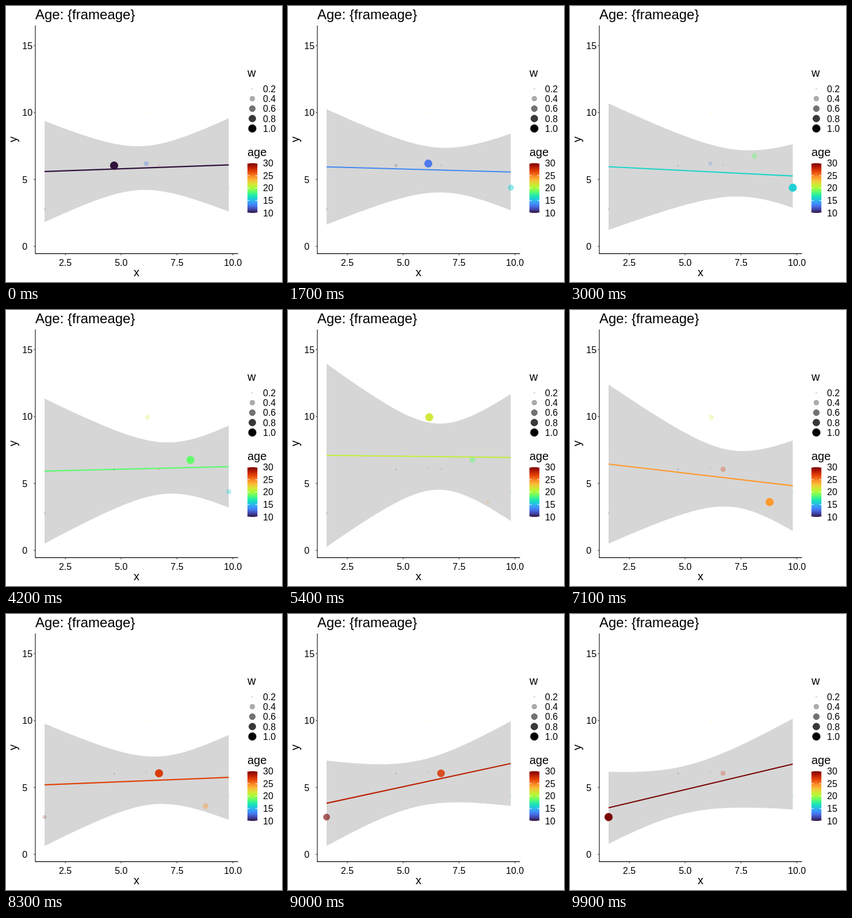
An HTML page that plays this animation: 480 px wide and 480 px high, repeating every 10 s.

```html
<!DOCTYPE html>
<html lang="en">
<head>
<meta charset="utf-8">
<title>Weighted regression by age</title>
<style>
  html, body { margin: 0; width: 100%; height: 100%; overflow: hidden; background: #fff; }
  svg { display: block; width: 100%; height: 100%; }
  text { font-family: "Liberation Sans", Arial, sans-serif; font-size: 16px; fill: #000; }
  .head { font-size: 20px; }
  .title { font-size: 24px; }
  .mid { text-anchor: middle; }
</style>
</head>
<body>
<svg id="stage" viewBox="0 0 480 480"></svg>
<script>
const FRAMES = 100, STEP = 100;
const AGE_MIN = 10, AGE_MAX = 30;
const SIGMA = 2, W_MIN = 0.2;
const T_CRIT = 2.4469; // 97.5 % quantile, 6 degrees of freedom
const LINE = 1.067;
const TURBO = ['30123b', '4145ab', '4675ed', '39a2fc', '1bcfd4', '24eca6', '61fc6c', 'a4fc3b',
  'd1e834', 'f3c63a', 'fe9b2d', 'f36315', 'd93806', 'b11901', '7a0402'];
const DATA = [[4.685, 6.04], [6.125, 6.19], [9.815, 4.39], [8.1, 6.76],
  [6.17, 9.95], [8.78, 3.61], [6.695, 6.06], [1.575, 2.79]]
  .map(([x, y], i) => ({ x, y, age: AGE_MIN + i * (AGE_MAX - AGE_MIN) / 7 }));

const stage = document.getElementById('stage');
const px = x => 5.9 + 38.87 * x;
const py = y => 418.1 - 23.28 * y;

function add(tag, attrs, parent = stage) {
  const el = document.createElementNS('http://www.w3.org/2000/svg', tag);
  set(el, attrs);
  parent.appendChild(el);
  return el;
}

function set(el, attrs) {
  for (const key in attrs) el.setAttribute(key, attrs[key]);
}

function label(text, x, y, cls = '', extra = {}) {
  add('text', { x, y, class: cls, ...extra }).textContent = text;
}

function rule(x1, y1, x2, y2, stroke = '#000') {
  return add('line', { x1, y1, x2, y2, stroke, 'stroke-width': LINE });
}

function turbo(age) {
  const t = (age - AGE_MIN) / (AGE_MAX - AGE_MIN) * (TURBO.length - 1);
  const i = Math.min(Math.floor(t), TURBO.length - 2);
  const channel = (hex, c) => parseInt(hex.substr(c * 2, 2), 16);
  const mix = c => Math.round(channel(TURBO[i], c) * (1 - t + i) + channel(TURBO[i + 1], c) * (t - i));
  return `rgb(${[0, 1, 2].map(mix)})`;
}

// Weight drives both the dot area and its opacity.
function styleDot(dot, w) {
  const k = (w - W_MIN) / (1 - W_MIN);
  const fontSize = (1 + 5 * Math.sqrt(k)) * 2.845 + 0.945;
  const alpha = 0.1 + 0.9 * k;
  set(dot, { r: 0.375 * fontSize, 'fill-opacity': alpha, 'stroke-opacity': alpha });
}

function addDot(cx, cy, color) {
  return add('circle', { cx, cy, fill: color, stroke: color, 'stroke-width': 0.709 });
}

const weight = (age, center) => Math.max(W_MIN, Math.exp(-((age - center) ** 2) / (2 * SIGMA ** 2)));

function fit(weights) {
  const sum = f => DATA.reduce((acc, p, i) => acc + weights[i] * f(p), 0);
  const total = sum(() => 1);
  const mx = sum(p => p.x) / total;
  const my = sum(p => p.y) / total;
  const sxx = sum(p => (p.x - mx) ** 2);
  const slope = sum(p => (p.x - mx) * (p.y - my)) / sxx;
  const at = x => my + slope * (x - mx);
  const variance = sum(p => (p.y - at(p.x)) ** 2) / (DATA.length - 2);
  const margin = x => T_CRIT * Math.sqrt(variance * (1 / total + (x - mx) ** 2 / sxx));
  return { at, margin };
}

// Moving parts
const ribbon = add('polygon', { fill: '#d6d6d6' });
const trend = add('line', { 'stroke-width': 2.134 });
const dots = DATA.map(p => addDot(px(p.x), py(p.y), turbo(p.age)));

// Axes
rule(51, 34, 51, 431);
rule(50.5, 430.6, 403.5, 430.6);
for (const y of [0, 5, 10, 15]) {
  rule(48.3, py(y), 51, py(y), '#333');
  label(y, 28.3, py(y) + 5.8);
}
for (const x of [2.5, 5, 7.5, 10]) {
  rule(px(x), 430.6, px(x), 433.4, '#333');
  label(x.toFixed(1), px(x), 452, 'mid');
}
label('Age: {frameage}', 51, 23, 'title');
label('x', 227, 470, 'head mid');
label('y', 0, 0, 'head mid', { transform: 'translate(19.3 232) rotate(-90)' });

// Weight legend
label('w', 420, 122.6, 'head');
for (let i = 0; i < 5; i++) {
  const w = 0.2 * (i + 1), y = 143.9 + 17.28 * i;
  styleDot(addDot(428.4, y, '#000'), w);
  label(w.toFixed(1), 447, y + 5.8);
}

// Age legend
const BAR = { x: 419.9, y: 273.4, width: 17.28, height: 86.4 };
label('age', 420, 260.8, 'head');
const gradient = add('linearGradient', { id: 'ages', x1: 0, y1: 1, x2: 0, y2: 0 });
TURBO.forEach((hex, i) =>
  add('stop', { offset: i / (TURBO.length - 1), 'stop-color': '#' + hex }, gradient));
add('rect', { ...BAR, fill: 'url(#ages)' });
for (let age = AGE_MIN; age <= AGE_MAX; age += 5) {
  const y = BAR.y + BAR.height * (AGE_MAX - age) / (AGE_MAX - AGE_MIN);
  const right = BAR.x + BAR.width;
  rule(BAR.x, y, BAR.x + 3.46, y, '#fff');
  rule(right - 3.46, y, right, y, '#fff');
  label(age, 447, y + 5.8);
}

const X_MIN = Math.min(...DATA.map(p => p.x));
const X_MAX = Math.max(...DATA.map(p => p.x));
const GRID = Array.from({ length: 80 }, (_, i) => X_MIN + (X_MAX - X_MIN) * i / 79);

function draw(frame) {
  const age = AGE_MIN + (AGE_MAX - AGE_MIN) * frame / (FRAMES - 1);
  const weights = DATA.map(p => weight(p.age, age));
  const { at, margin } = fit(weights);
  const edge = side => GRID.map(x => `${px(x)},${py(at(x) + side * margin(x))}`);
  set(ribbon, { points: [...edge(1), ...edge(-1).reverse()].join(' ') });
  set(trend, { x1: px(X_MIN), y1: py(at(X_MIN)), x2: px(X_MAX), y2: py(at(X_MAX)), stroke: turbo(age) });
  dots.forEach((dot, i) => styleDot(dot, weights[i]));
}

const start = performance.now();
function tick() {
  draw(Math.floor((performance.now() - start) / STEP) % FRAMES);
  requestAnimationFrame(tick);
}
tick();
</script>
</body>
</html>
```
